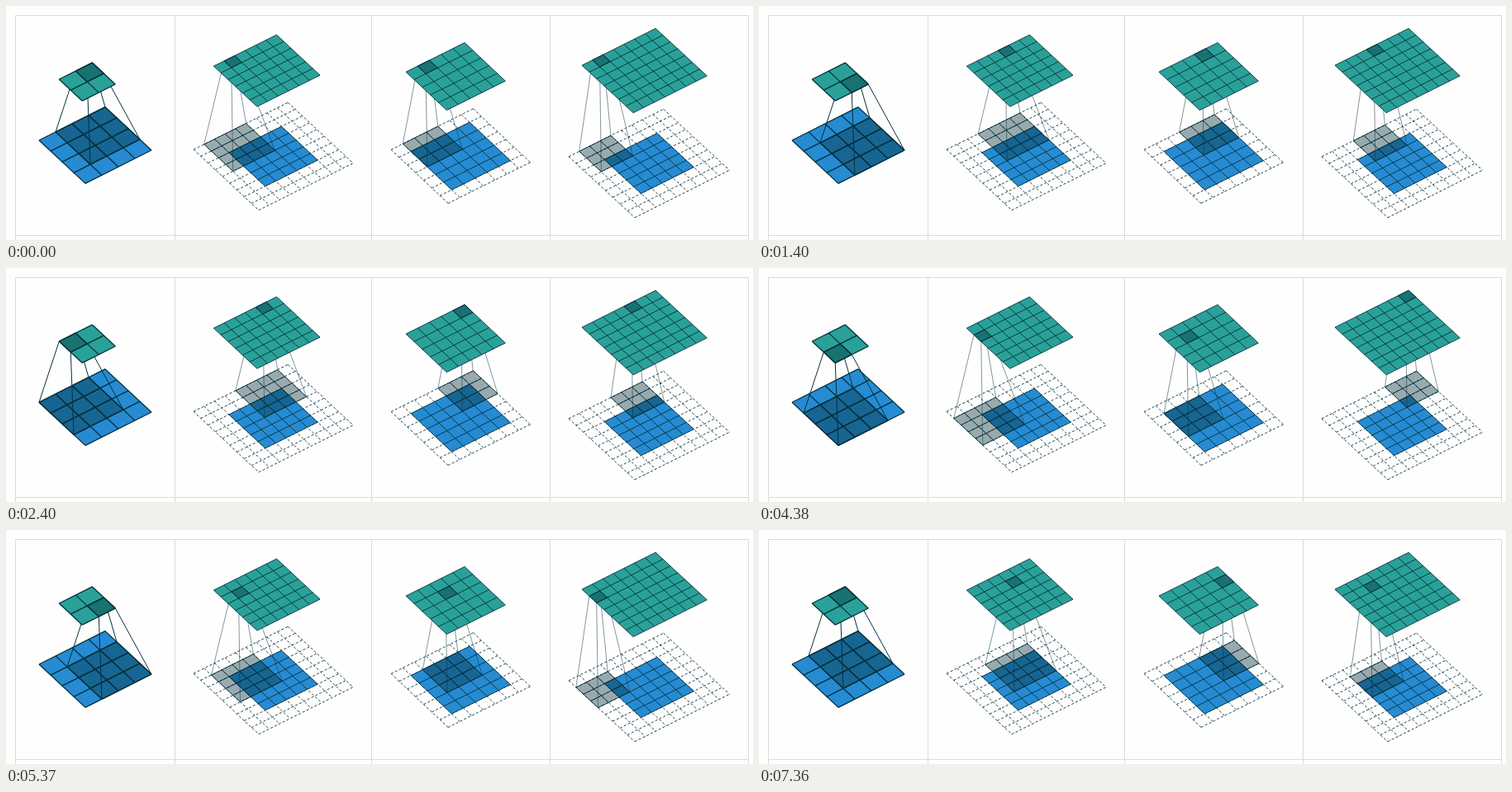
An HTML page with a canvas for the animation above (8 s loop, 904 px wide and 284 px high).

```html
<!DOCTYPE html>
<html lang="en">
<head>
<meta charset="utf-8">
<title>Convolution arithmetic</title>
<style>
html, body { margin: 0; width: 904px; height: 284px; overflow: hidden; background: #fefefe; }
canvas { display: block; }
</style>
</head>
<body>
<canvas id="stage" width="904" height="284"></canvas>
<script>
const ctx = document.getElementById('stage').getContext('2d');
const LOOP = 8000;
const CHANGES = [400, 1400, 2400, 3390, 4380, 5370, 6370, 7360];
const BLUE = '#268bd2', TEAL = '#2aa198', INK = '#04303b', SHADE = 'rgba(0,43,54,0.4)';

// base / top: left corners of the padded input and of the output plate
// col / row: step of one cell along each axis
const panels = [
  { base: [40, 163], top: [64.3, 89], col: [20, -10.1], row: [14, 13.1],
    size: 4, pad: 0, kernel: 3, line: 1.3, ray: 1 },
  { base: [227, 174.2], top: [251.3, 73], col: [12.7, -6.34], row: [8.75, 8.18],
    size: 5, pad: 2, kernel: 4, line: 0.9, ray: 0.5 },
  { base: [466, 174.4], top: [484, 80], col: [14.2, -7.1], row: [9.86, 9.3],
    size: 5, pad: 1, kernel: 3, line: 0.9, ray: 0.5 },
  { base: [681, 182.8], top: [697, 72], col: [12.74, -6.4], row: [8.87, 8.23],
    size: 5, pad: 2, kernel: 3, line: 0.9, ray: 0.5 }
];

const at = (p, origin, r, c) => [0, 1].map(i => origin[i] + c * p.col[i] + r * p.row[i]);

const corners = (p, origin, r, c, n) =>
  [[r, c], [r, c + n], [r + n, c + n], [r + n, c]].map(([y, x]) => at(p, origin, y, x));

function fill(points, color) {
  ctx.beginPath();
  points.forEach(q => ctx.lineTo(...q));
  ctx.fillStyle = color;
  ctx.fill();
}

function segment(a, b) {
  ctx.beginPath();
  ctx.moveTo(...a);
  ctx.lineTo(...b);
  ctx.stroke();
}

function grid(p, origin, r, c, n, color) {
  if (color) fill(corners(p, origin, r, c, n), color);
  ctx.lineWidth = p.line;
  for (let i = 0; i <= n; i++) {
    segment(at(p, origin, r + i, c), at(p, origin, r + i, c + n));
    segment(at(p, origin, r, c + i), at(p, origin, r + n, c + i));
  }
}

function drawPanel(p, step) {
  const full = p.size + 2 * p.pad;
  const out = full - p.kernel + 1;
  const index = (step + 1) % (out * out);
  const r = Math.floor(index / out), c = index % out;

  if (p.pad) {
    ctx.setLineDash([3, 2.4]);
    grid(p, p.base, 0, 0, full);
    ctx.setLineDash([]);
  }
  grid(p, p.base, p.pad, p.pad, p.size, BLUE);
  grid(p, p.base, r, c, p.kernel, SHADE);

  const from = corners(p, p.top, r, c, 1);
  const to = corners(p, p.base, r, c, p.kernel);
  ctx.lineWidth = p.ray;
  from.forEach((q, i) => segment(q, to[i]));

  grid(p, p.top, 0, 0, out, TEAL);
  grid(p, p.top, r, c, 1, SHADE);
}

function drawTable() {
  ctx.fillStyle = '#dadcdc';
  [11, 204, 442, 658, 898].forEach(x => ctx.fillRect(x, 11, 1, 273));
  [11, 278].forEach(y => ctx.fillRect(11, y, 888, 1));
}

function draw() {
  const t = performance.now() % LOOP;
  const step = CHANGES.filter(ms => ms <= t).length;
  ctx.fillStyle = '#fefefe';
  ctx.fillRect(0, 0, 904, 284);
  drawTable();
  ctx.strokeStyle = INK;
  ctx.lineJoin = ctx.lineCap = 'butt';
  panels.forEach(p => drawPanel(p, step));
  requestAnimationFrame(draw);
}
draw();
</script>
</body>
</html>
```
